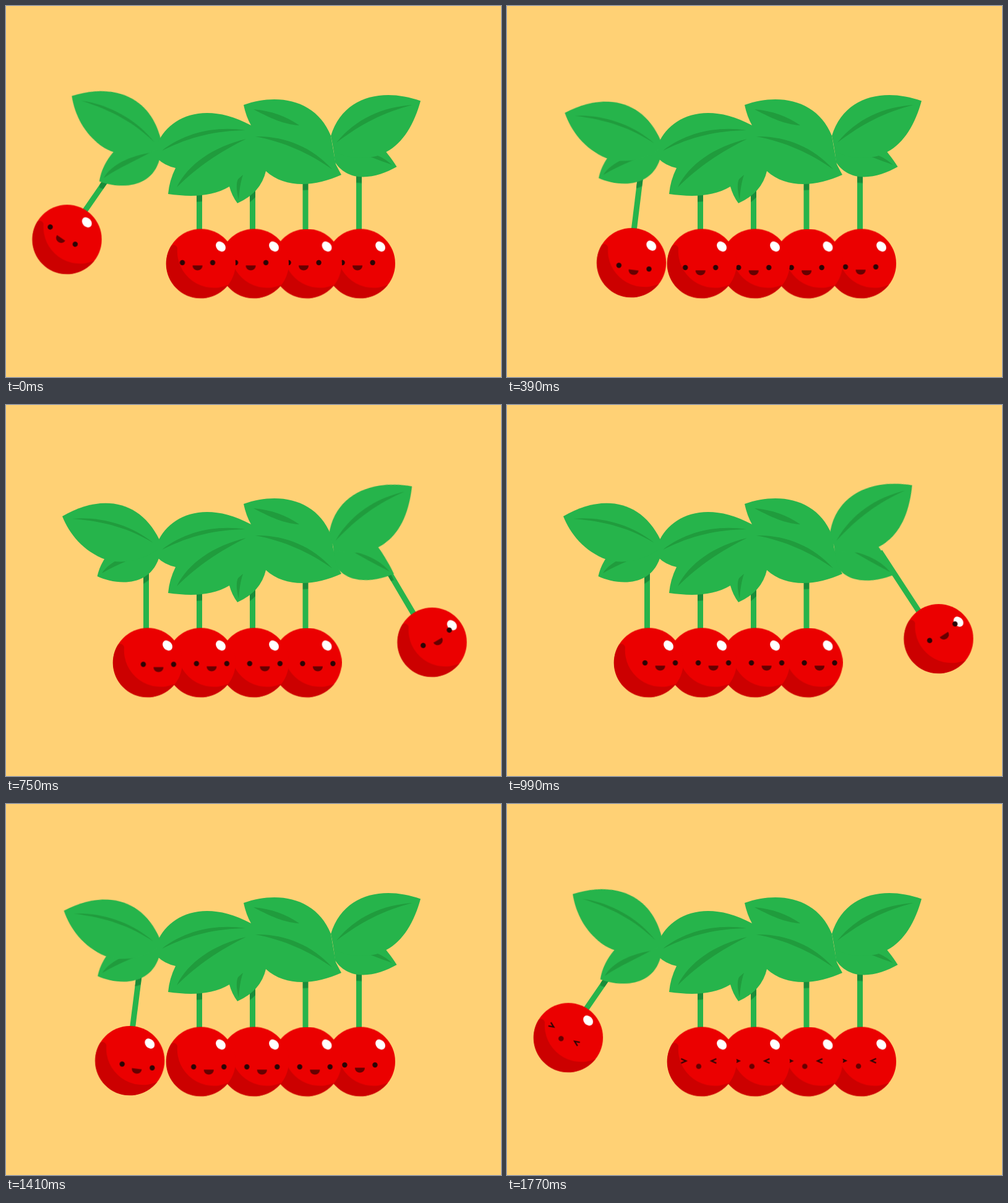
An HTML page without scripts that plays this animation: 800 by 600 pixels, repeating every 1800 ms.

```html
<!DOCTYPE html>
<html lang="en">
<head>
<meta charset="utf-8">
<title>Cherry cradle</title>
<style>
html, body { margin: 0; width: 100%; height: 100%; overflow: hidden; background: #ffd175; }
svg { display: block; width: 100vw; height: 100vh; }

.leaf { fill: #26b44b; }
.vein { fill: #209c3d; }
.shade { fill: #198c39; }
.stem { stroke: #26b44b; stroke-width: 9; }

/* Swinging parts: --a is the angle at the far end of the swing */
.l { animation: left 1.8s infinite; }
.r { animation: right 1.8s infinite; }
.pivot { transform-origin: -2.5px -228.5px; }
.jl { transform-origin: 250px 230px; }
.jr { transform-origin: 525px 230px; }
.cw { --a: 34.65deg; }
.ccw { --a: -34.65deg; }
.big.l { --a: 13deg; }
.small.l { --a: -3.75deg; }
.big.r { --a: -10.3deg; }
.small.r { --a: 8.2deg; }

@keyframes left {
  0% { transform: rotate(var(--a)); animation-timing-function: cubic-bezier(.4, 0, .65, .47); }
  25% { transform: rotate(0deg); animation-timing-function: linear; }
  75% { transform: rotate(0deg); animation-timing-function: cubic-bezier(.35, .53, .6, 1); }
  100% { transform: rotate(var(--a)); }
}
@keyframes right {
  0% { transform: rotate(0deg); animation-timing-function: linear; }
  25% { transform: rotate(0deg); animation-timing-function: cubic-bezier(.35, .53, .6, 1); }
  50% { transform: rotate(var(--a)); animation-timing-function: cubic-bezier(.4, 0, .65, .47); }
  75%, 100% { transform: rotate(0deg); }
}

/* Faces glance towards the moving cherry */
.look1 { animation: look1 1.8s linear infinite; }
.look { animation: look 1.8s linear infinite; }
.look5 { animation: look5 1.8s linear infinite; }
@keyframes look1 {
  0%, 100% { transform: translate(-9.2px, -1px); }
  5% { transform: translate(-8.6px, -.4px); }
  13.333% { transform: translate(-3.3px, 3.6px); }
  25% { transform: translate(8px, 8px); }
  30% { transform: translate(13.5px, 8.5px); }
  38% { transform: translate(17px, 4.5px); }
  50% { transform: translate(18.3px, -.7px); }
  55% { transform: translate(18.5px, .5px); }
  70% { transform: translate(20.5px, 7.5px); }
  75% { transform: translate(18.5px, 8.5px); }
  80% { transform: translate(10px, 6.5px); }
  85% { transform: translate(1.9px, 3.6px); }
  93% { transform: translate(-7px, .2px); }
}
@keyframes look {
  0%, 100% { transform: translate(-5.5px, -1.5px); }
  5% { transform: translate(-5.4px, -.9px); }
  13.333% { transform: translate(-4.5px, 2.5px); }
  25% { transform: translate(-1.5px, 8px); }
  30% { transform: translate(6.5px, 8.5px); }
  36% { transform: translate(14px, 5.5px); }
  42% { transform: translate(17.5px, 1.5px); }
  50% { transform: translate(18.3px, -.7px); }
  55% { transform: translate(18.5px, .5px); }
  70% { transform: translate(20.5px, 7.5px); }
  75% { transform: translate(18.5px, 8.8px); }
  80% { transform: translate(10px, 8.5px); }
  85% { transform: translate(2px, 6.5px); }
  92% { transform: translate(-4.2px, 1px); }
}
@keyframes look5 {
  0%, 100% { transform: translate(-5px, -1.5px); }
  5% { transform: translate(-4.9px, -.9px); }
  13.333% { transform: translate(-4px, 2.5px); }
  25% { transform: translate(-.5px, 6.5px); }
  30% { transform: translate(3.6px, 5.2px); }
  40% { transform: translate(9px, -2px); }
  50% { transform: translate(11.2px, -6.2px); }
  55% { transform: translate(10.8px, -5.5px); }
  70% { transform: translate(3.6px, 5.2px); }
  75% { transform: translate(0px, 6.5px); }
  85% { transform: translate(-3.5px, 3.5px); }
  93% { transform: translate(-4.8px, -.5px); }
}

.open { animation: open 1.8s step-end infinite; }
.shut { animation: shut 1.8s step-end infinite; }
@keyframes open {
  0%, 38.333%, 88.333%, 100% { opacity: 1; }
  25%, 75% { opacity: 0; }
}
@keyframes shut {
  0%, 38.333%, 88.333%, 100% { opacity: 0; }
  25%, 75% { opacity: 1; }
}
</style>
</head>
<body>
<svg viewBox="0 0 800 600">
  <defs>
    <clipPath id="stemClip"><rect x="-7" y="-172" width="9" height="120"/></clipPath>
    <path id="stem" class="stem" d="M-2.5-170V-50"/>

    <g id="body">
      <circle r="56" fill="#eb0000"/>
      <path fill="#cc0000" d="M-48-29C-44-32-39-29-38-25A59.2 59.2 0 0 0 44 34.6A56 56 0 0 1-48-29Z"/>
      <ellipse rx="9" ry="7" fill="#fff" transform="translate(32 -27.5) rotate(48)"/>
    </g>

    <g id="face">
      <g class="open">
        <g fill="#2a0505"><circle cx="-24.5" r="4.2"/><circle cx="24.5" r="4.2"/></g>
        <path fill="#660000" d="M-8 4.5H8C8 15-8 15-8 4.5Z"/>
      </g>
      <g class="shut">
        <path fill="none" stroke="#2a0505" stroke-width="2.2" d="M-28.5-3.5L-20.5 0L-28.5 3.5M28.5-3.5L20.5 0L28.5 3.5"/>
        <circle cy="8.7" r="4.3" fill="#660000"/>
      </g>
    </g>

    <path id="smallL" d="M147.5 277C152 256 168 226 210 205L250 225L247 248C230 297 175 290 147.5 277Z"/>
    <path id="smallR" d="M631.5 260C624 248 612 232 598 217L527 215L532 253C555 288 600 278 631.5 260Z"/>
    <path id="mid" d="M245 247V222C263 180 320 152 396 193Q388 179 384 160C440 140 502 152 525 210L533 256Q536 262 542 273C500 292 452 296 420 267Q412 302 374 319Q365 307 361 292C333 309 297 309 262 304Q264 282 274 262Q256 258 245 247Z"/>
  </defs>

  <!-- Cherries, the leftmost in front -->
  <g transform="translate(573 416.5)">
    <g class="r pivot ccw">
      <use href="#stem"/>
      <g clip-path="url(#stemClip)"><g class="r pivot cw">
        <g transform="translate(-573 -406.5)"><use href="#smallR" class="shade small r jr"/></g>
      </g></g>
      <g class="r cw"><use href="#body"/></g>
      <g class="look5"><use href="#face"/></g>
    </g>
  </g>
  <g transform="translate(486.5 416.5)">
    <use href="#stem"/>
    <g clip-path="url(#stemClip)"><use href="#mid" class="shade" x="-486.5" y="-406.5"/></g>
    <use href="#body"/>
    <g class="look"><use href="#face"/></g>
  </g>
  <g transform="translate(401 416.5)">
    <use href="#stem"/>
    <g clip-path="url(#stemClip)"><use href="#mid" class="shade" x="-401" y="-406.5"/></g>
    <use href="#body"/>
    <g class="look"><use href="#face"/></g>
  </g>
  <g transform="translate(315 416.5)">
    <use href="#stem"/>
    <g clip-path="url(#stemClip)"><use href="#mid" class="shade" x="-315" y="-406.5"/></g>
    <use href="#body"/>
    <g class="look"><use href="#face"/></g>
  </g>
  <g transform="translate(229 416.5)">
    <g class="l pivot cw">
      <use href="#stem"/>
      <g clip-path="url(#stemClip)"><g class="l pivot ccw">
        <g transform="translate(-229 -406.5)"><use href="#smallL" class="shade small l jl"/></g>
      </g></g>
      <g class="l ccw"><use href="#body"/></g>
      <g class="look1"><use href="#face"/></g>
    </g>
  </g>

  <!-- Leaves -->
  <g class="small l jl">
    <use href="#smallL" class="leaf"/>
    <path class="vein" d="M155 272C170 250 200 240 232 236C210 247 182 256 155 272Z"/>
  </g>
  <g class="big l jl">
    <path class="leaf" d="M91 180C150 145 215 150 248 218L250 230C225 250 190 259 161 250C125 237 102 208 91 180Z"/>
    <path class="vein" d="M107 184C150 180 200 192 238 223C200 200 160 188 107 184Z"/>
  </g>
  <g class="small r jr">
    <use href="#smallR" class="leaf"/>
    <path class="vein" d="M624 257C612 246 595 236 560 232C585 243 605 250 624 257Z"/>
  </g>
  <g class="big r jr">
    <path class="leaf" d="M670 153.5C610 132 545 145 525 210L530 235C560 252 600 246 614.5 236C642 222 660 190 670 153.5Z"/>
    <path class="vein" d="M657 160C610 163 565 182 534 221C575 190 610 172 657 160Z"/>
  </g>
  <use href="#mid" class="leaf"/>
  <g class="vein">
    <path d="M252 234C290 204 340 194 387 201C340 202 300 210 252 234Z"/>
    <path d="M276 293C295 255 335 228 388 215C345 236 310 260 276 293Z"/>
    <path d="M376 313C372 298 372 286 375 280L383 273C379 285 377 298 376 313Z"/>
    <path d="M400 167C430 170 452 178 474 193C455 192 435 186 400 167Z"/>
    <path d="M403 211C450 210 495 228 527 264C490 238 450 220 403 211Z"/>
  </g>
</svg>
</body>
</html>
```
